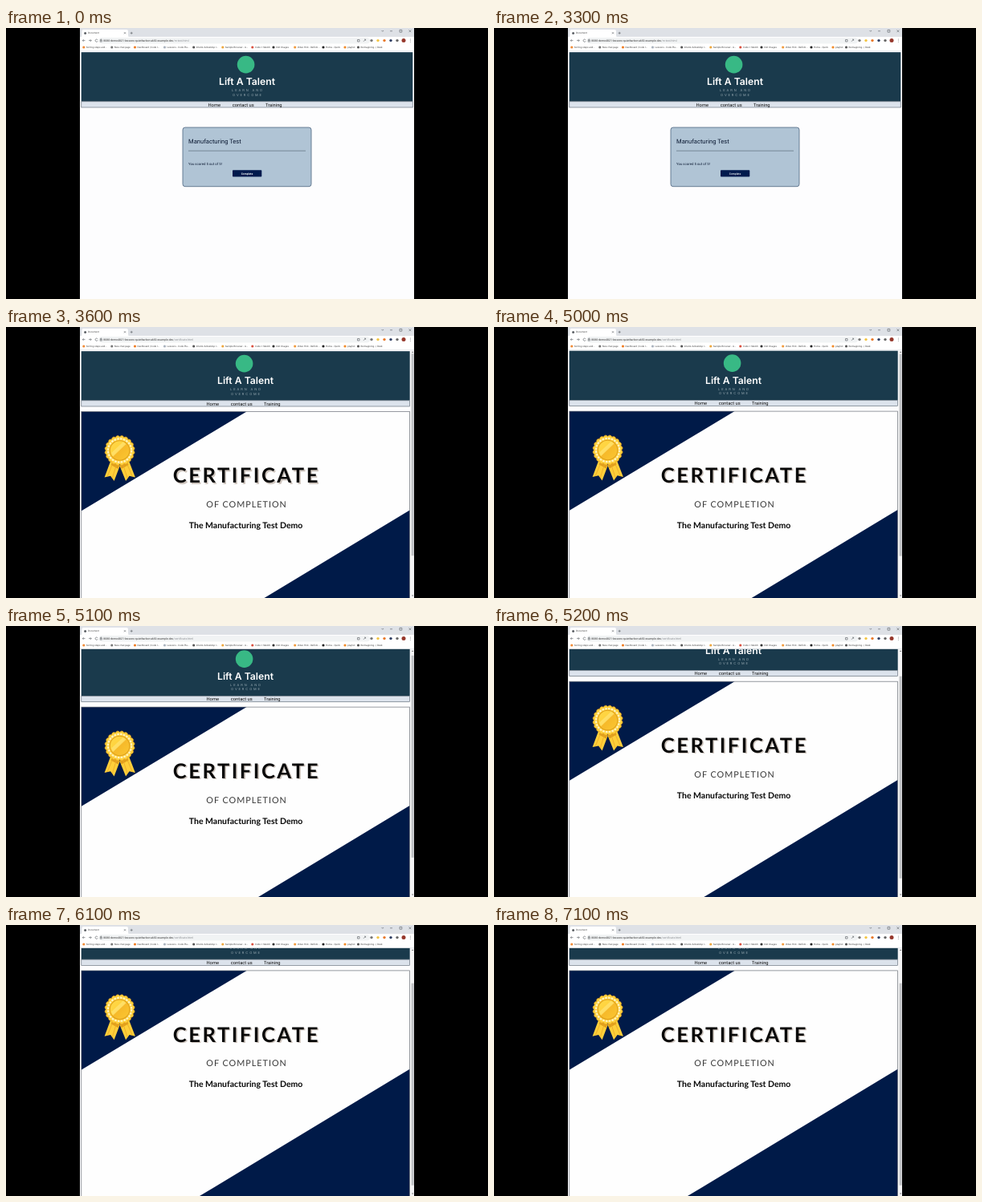
An HTML page for the animation above (7.6 s loop, 600 px wide and 338 px high).

```html
<!DOCTYPE html>
<html lang="en">
<head>
<meta charset="utf-8">
<style>
html, body { margin: 0; width: 100%; height: 100%; overflow: hidden; background: #000; }
svg { display: block; width: 100vw; height: 100vh; }
text { font-family: Roboto, Arial, sans-serif; white-space: pre; text-rendering: geometricPrecision; }
.brand { font-family: Inter, Arial, sans-serif; text-anchor: middle; }
.cert { font-family: Lato, Arial, sans-serif; }
.title { font-size: 25.6px; font-weight: 700; letter-spacing: 2.5px; }
.tiny { font-size: 3px; fill: #444; }
.nav { fill: #dce3ec; stroke: #56626e; stroke-width: .6px; }
</style>
</head>
<body>
<svg viewBox="0 0 600 338">
  <defs>
    <clipPath id="view"><rect x="92" y="28.5" width="416" height="310"/></clipPath>
    <linearGradient id="gold" x2="1" y2="1">
      <stop offset="0" stop-color="#ffd94a"/><stop offset=".45" stop-color="#ffd23c"/>
      <stop offset=".5" stop-color="#f6b92a"/><stop offset="1" stop-color="#fbc832"/>
    </linearGradient>
    <g id="banner">
      <circle cx="298.6" cy="45.6" r="10.8" fill="#38b985"/>
      <text class="brand" x="300" y="71" font-size="12.2" font-weight="600" fill="#fff">Lift A Talent</text>
      <g font-size="4" fill="#9aabb4" letter-spacing="1.9">
        <text class="brand" x="301" y="79.2">LEARN AND</text>
        <text class="brand" x="301" y="84.6">OVERCOME</text>
      </g>
      <g font-size="5.75" fill="#111">
        <text x="251.5" y="97.5">Home</text>
        <text x="281.8" y="97.5">contact us</text>
        <text x="323" y="97.5">Training</text>
      </g>
    </g>
  </defs>
  <rect width="600" height="338"/>
  <rect x="92" width="416" height="338" fill="#fdfdfe"/>

  <g clip-path="url(#view)">
    <g id="quiz">
      <rect x="93.7" y="30.2" width="412.6" height="61.4" fill="#1a3a4c"/>
      <rect class="nav" x="93.8" y="91.8" width="412.4" height="7.2"/>
      <use href="#banner"/>
      <rect x="220" y="124" width="160" height="73.7" rx="3" fill="#b0c4d5" stroke="#4d6580" stroke-width=".8"/>
      <text x="227" y="143.8" font-size="7.6" fill="#0c1a33">Manufacturing Test</text>
      <path d="M227 153.2H373" stroke="#5d6d7c" stroke-width=".7"/>
      <text x="227" y="171" font-size="4.3" fill="#0c1a33">You scored 5 out of 5!</text>
      <rect x="282" y="177.2" width="36.3" height="8.3" rx=".8" fill="#001a4d"/>
      <text id="button" x="300" y="182.5" font-size="3.4" fill="#fff" text-anchor="middle">Complete</text>
    </g>

    <g id="award">
      <g id="page">
        <rect x="93.7" y="30.2" width="409" height="61.4" fill="#1a3a4c"/>
        <rect class="nav" x="93.8" y="91.8" width="408.8" height="7.2"/>
        <use href="#banner" x="-2"/>
        <rect x="93.8" y="105.6" width="408.8" height="300" fill="#fefefe"/>
        <path d="M94 105.6H299.5L94 229.2ZM502.5 228.5V400H219Z" fill="#001a48"/>
        <rect x="93.8" y="105.6" width="408.8" height="300" fill="none" stroke="#6b7078" stroke-width=".7"/>
        <g transform="translate(141.6 154)">
          <path d="M-11 12L-19 33.5-11.5 31.8-7 38 1 17ZM11 12L19.3 33.5 12 31.8 7.5 38-1 17Z" fill="#ffcf3a"/>
          <path d="M-9 14L0 18-2 23-11 18ZM9 14L0 18 2 23 11 18Z" fill="#e2a01c"/>
          <path d="M-9.5 18L-15.5 32.5M-4.5 19L-9.3 34.5M9.5 18L15.8 32.5M4.5 19L9.6 34.5" stroke="#eaa926" stroke-width=".8"/>
          <path id="rosette" fill="#ffd13d" stroke="#e7a621" stroke-width=".8"/>
          <circle r="14.6" fill="none" stroke="#fff2c0" stroke-width="2.2" stroke-dasharray="2.6 1.22"/>
          <circle r="12.3" fill="url(#gold)" stroke="#e0a01e" stroke-width="1.1"/>
          <path d="M-10.5 3L4-10.5 8-8-8.5 7.5Z" fill="#ffe477" opacity=".7"/>
        </g>
        <text class="cert title" x="209.4" y="195.8" fill="#cfc6bf">CERTIFICATE</text>
        <text class="cert title" x="207.8" y="194.4" fill="#080808">CERTIFICATE</text>
        <text class="cert" x="249.3" y="225" font-size="10.8" letter-spacing="1" fill="#383838">OF COMPLETION</text>
        <text class="cert" x="227.8" y="251" font-size="10.5" font-weight="700" fill="#080808">The Manufacturing Test Demo</text>
      </g>
      <rect x="503.4" y="28.5" width="4.6" height="310" fill="#f3f3f4"/>
      <rect id="thumb" x="504.6" y="33.2" width="3" height="252" fill="#bfc1c4"/>
      <path d="M504.8 32l1.3-1.6 1.3 1.6ZM504.8 334.5l1.3 1.6 1.3-1.6Z" fill="#777"/>
    </g>
  </g>

  <g id="browser">
    <rect x="92" width="416" height="11.5" fill="#dee1e6"/>
    <path d="M93 11.5Q94.5 11 94.5 9V4Q94.5 2 96.5 2H150Q152 2 152 4V9Q152 11 153.5 11.5Z" fill="#fff"/>
    <rect x="92" y="11" width="416" height="17.5" fill="#fff"/>
    <rect x="115.5" y="12" width="337.5" height="7.4" rx="3.7" fill="#f1f3f4"/>
    <path d="M92 28.5H508" stroke="#d5d8dc" stroke-width=".5"/>
    <circle cx="98.6" cy="6.4" r="1.5" fill="#5f6368"/>
    <text class="tiny" x="102" y="7.4">Document</text>
    <g fill="none" stroke="#55595e" stroke-width=".6">
      <path d="M147 5.3l2 2m0-2l-2 2M154.7 6.3h3m-1.5-1.5v3"/>
      <path d="M467.5 3l1.3 1.3 1.3-1.3M478 3.8h3M490 2.4h2.8v2.8h-2.8ZM501.5 2.4l2.8 2.8m0-2.8l-2.8 2.8"/>
      <path d="M98.5 15.6h-3.2m1.4-1.4l-1.4 1.4 1.4 1.4M103 15.6h3.2m-1.4-1.4l1.4 1.4-1.4 1.4"/>
      <path d="M114 14.8a1.6 1.6 0 1 0 .2 1.4M117.3 15.3h2v1.8h-2ZM117.7 15.2v-.7a.6.6 0 0 1 1.2 0v.7"/>
      <path d="M437.5 14.5h2.5v2.5h-2.5ZM445 16.8l2.5-2.5M446 14.2h1.6v1.6"/>
    </g>
    <text x="121.3" y="16.9" font-size="3.5" fill="#333">8080-demo4821-lessons-quietharbor-ab30.example.dev<tspan id="path" fill="#8a8d91"></tspan></text>
  </g>
</svg>
<script>
const $ = id => document.getElementById(id);
const LOOP = 7600, PRESS = 3300, AWARD = 3600, SCROLL = 5000;
const scrollSteps = [0.5, 4.5, 36.4, 48.7]; // smooth wheel scroll, one value per 100 ms

function add(parent, tag, attrs, content = '') {
  const el = document.createElementNS('http://www.w3.org/2000/svg', tag);
  for (const key in attrs) el.setAttribute(key, attrs[key]);
  el.textContent = content;
  parent.append(el);
}
const dot = (x, y, r, fill) => add($('browser'), 'circle', { cx: x, cy: y, r, fill });

const bookmarks = [
  [96.8, '#f08a35', 'Sorting steps and...'], [131.8, '#777', 'New chat page'],
  [160.5, '#ef7c22', 'Dashboard | Code I...'], [197.5, '#a9b2bd', 'Lessons - Code Pla...'],
  [233.7, '#555', 'Intents & Desktop I...'], [269.8, '#eda63b', 'Sample Browser - A...'],
  [306.8, '#d9503f', 'Code + Sketch'], [333, '#333', 'Unit Images'],
  [359.7, '#f19a3d', 'Video Hint - Definiti...'], [395, '#222', 'Home - Quick'],
  [422, '#f28b28', 'playlist'], [438.5, '#555', 'Reimagining...| Desk']
];
for (const [x, color, label] of bookmarks) {
  dot(x, 24, 1.6, color);
  add($('browser'), 'text', { class: 'tiny', x: x + 3, y: 25 }, label);
}
['#777', '#f3c544', '#e8792c', '#2f3e63', '#666', '#96382c'].forEach((color, i) =>
  dot(455 + i * 8, 15.6, i === 5 ? 2.5 : 1.7, color));
for (const y of [14, 15.6, 17.2]) dot(503.3, y, 0.45, '#555');

let outline = '';
for (let i = 0; i <= 240; i++) {
  const a = i / 240 * 2 * Math.PI, r = 17.1 + 1.5 * Math.abs(Math.sin(a * 10));
  outline += (i ? 'L' : 'M') + (r * Math.cos(a)).toFixed(2) + ' ' + (r * Math.sin(a)).toFixed(2);
}
$('rosette').setAttribute('d', outline + 'Z');

function render(t) {
  const awarded = t >= AWARD;
  const step = Math.min(Math.floor((t - SCROLL) / 100), scrollSteps.length - 1);
  const y = step < 0 ? 0 : scrollSteps[step];
  $('quiz').style.display = awarded ? 'none' : '';
  $('award').style.display = awarded ? '' : 'none';
  $('button').setAttribute('font-weight', t < PRESS ? 700 : 500);
  $('path').textContent = awarded ? '/certificate.html' : '/m-test.html';
  $('page').setAttribute('transform', `translate(0 ${-y})`);
  $('thumb').setAttribute('y', 33.2 + y * 0.81);
}

const start = performance.now();
function tick() {
  render((performance.now() - start) % LOOP);
  requestAnimationFrame(tick);
}
tick();
</script>
</body>
</html>
```
